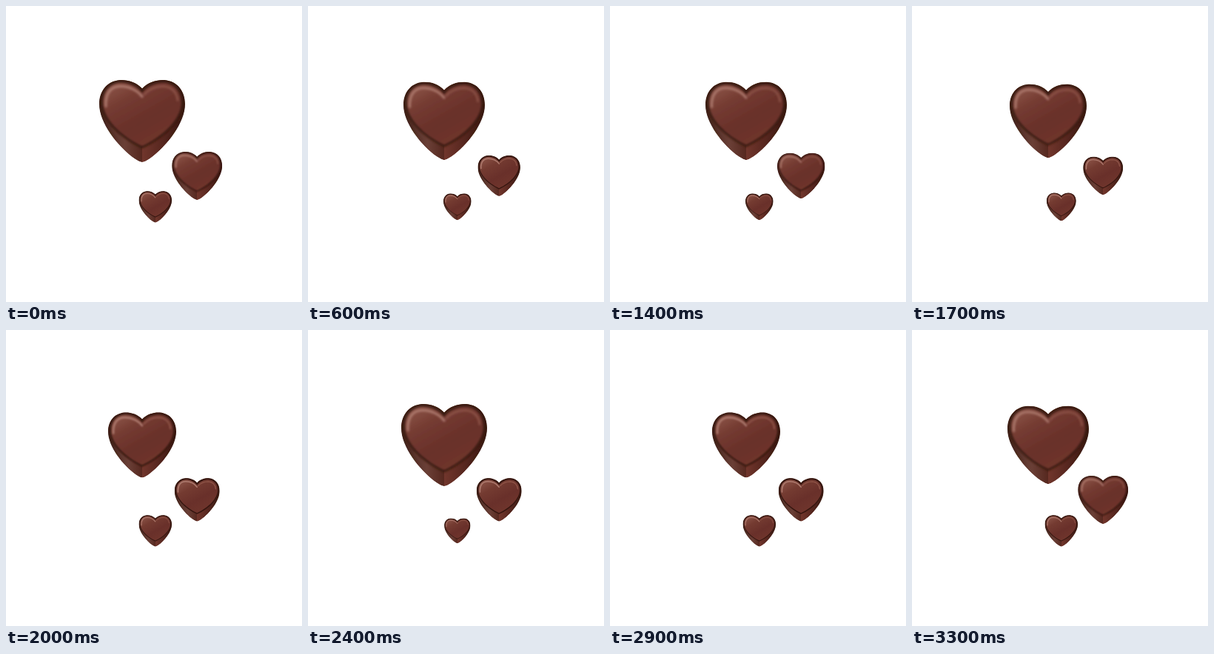
These frames come from a looping animation (400 px wide and 400 px high, 3400 ms). An HTML page:

```html
<!DOCTYPE html>
<html lang="en">
<head>
<meta charset="utf-8">
<title>Chocolate hearts</title>
<style>
html, body { margin: 0; width: 100%; height: 100%; overflow: hidden; background: #fff; }
svg { display: block; width: 100vw; height: 100vh; }
</style>
</head>
<body>
<svg viewBox="0 0 400 400">
  <defs>
    <linearGradient id="side" x1="0" y1="0" x2="1" y2="0">
      <stop offset="0" stop-color="#4a2a22"/>
      <stop offset=".3" stop-color="#6a3f36"/>
      <stop offset=".5" stop-color="#56281f"/>
      <stop offset=".5" stop-color="#71362c"/>
      <stop offset=".72" stop-color="#592820"/>
      <stop offset="1" stop-color="#3a1a13"/>
    </linearGradient>
    <linearGradient id="top" x1=".1" y1="0" x2=".8" y2="1">
      <stop offset="0" stop-color="#8d5549"/>
      <stop offset=".28" stop-color="#743b31"/>
      <stop offset=".6" stop-color="#69302a"/>
      <stop offset="1" stop-color="#72372d"/>
    </linearGradient>
    <linearGradient id="rim" x1="0" y1="0" x2="0" y2="1">
      <stop offset="0" stop-color="#38190f"/>
      <stop offset=".45" stop-color="#38190f" stop-opacity=".75"/>
      <stop offset=".8" stop-color="#38190f" stop-opacity="0"/>
    </linearGradient>
    <filter id="soft" x="-20%" y="-20%" width="140%" height="140%"><feGaussianBlur stdDeviation="1.5"/></filter>
    <path id="outer" d="M0-44C8-53 20-56 30-55.5C48-54 58-40 58-23C58 2 34 34 10 51Q3 55.5 0 55.5Q-3 55.5-10 51C-34 34-58 2-58-23C-58-40-48-54-30-55.5C-20-56-8-53 0-44Z"/>
    <path id="face" d="M0-38C6-47 18-52 29-52C44-51 53-40 53-25C53-4 30 20 0 34C-30 20-53-4-53-25C-53-40-44-51-29-52C-18-52-6-47 0-38Z"/>
    <clipPath id="edge"><use href="#outer"/></clipPath>
    <g id="heart" clip-path="url(#edge)">
      <use href="#outer" fill="url(#side)"/>
      <use href="#outer" fill="none" stroke="url(#rim)" stroke-width="5" filter="url(#soft)"/>
      <use href="#face" fill="none" stroke="#35150f" stroke-width="5" filter="url(#soft)"/>
      <use href="#face" fill="url(#top)" filter="url(#soft)"/>
      <g fill="none" stroke-linecap="round" filter="url(#soft)">
        <path d="M-49-20C-50-38-42-47-29-47C-17-47-6-41 0-33" stroke="#ae7b6f" stroke-width="3"/>
        <path d="M3-36C10-44 19-47 29-47C40-46 47-39 48-28" stroke="#8f5548" stroke-width="2.5"/>
      </g>
    </g>
  </defs>
  <use href="#heart" id="big"/>
  <use href="#heart" id="mid"/>
  <use href="#heart" id="small"/>
</svg>
<script>
const LOOP = 3400, FRAME = 100, BEAT = 960, BEATS = 3;

const hearts = [
  { id: 'small', x: 201.8, y: 271.5, size: 0.384 },
  { id: 'mid', x: 258.2, y: 229.5, size: 0.586 },
  { id: 'big', x: 184, y: 155.5, size: 1 }
];

// Triangle wave, 0 at rest and 1 when smallest, in quarter steps.
function shrink(t) {
  if (t < 0 || t > BEAT * BEATS) return 0;
  const phase = t / BEAT % 1;
  return Math.round(4 * (1 - Math.abs(1 - 2 * phase))) / 4;
}

function draw() {
  const now = performance.now() % LOOP;
  const t = now - now % FRAME;
  hearts.forEach(({ id, x, y, size }, i) => {
    const start = 50 + i * BEAT / 4;
    const s = size * (1 - 0.207 * shrink(t - start));
    document.getElementById(id).setAttribute('transform', `translate(${x} ${y}) scale(${s})`);
  });
  requestAnimationFrame(draw);
}
draw();
</script>
</body>
</html>
```
